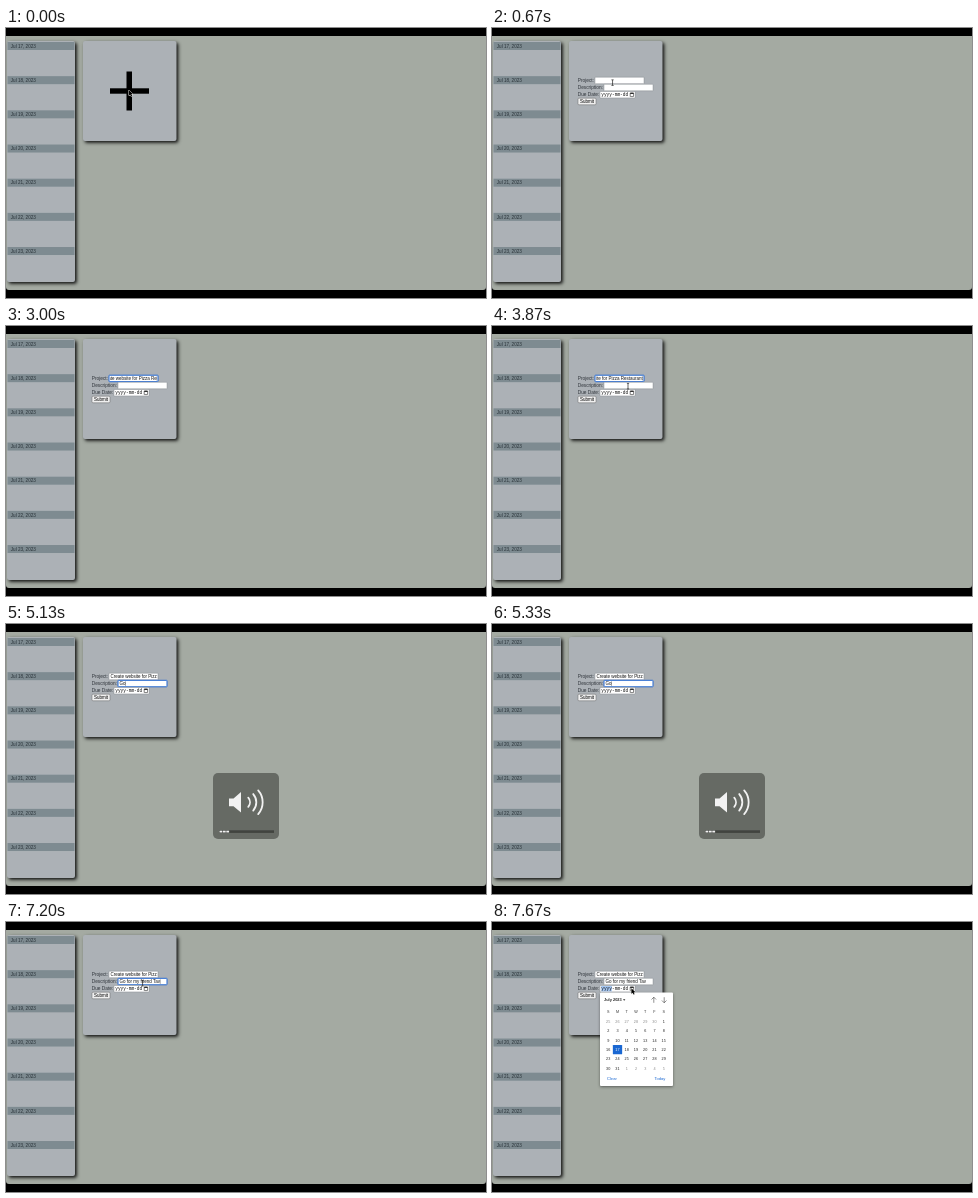
An HTML page with a canvas that plays this animation: 480x270 px, repeating every 8000 ms.

```html
<!DOCTYPE html>
<html lang="en">
<head>
<meta charset="utf-8">
<title>Project planner</title>
<style>
html, body { margin: 0; width: 100%; height: 100%; overflow: hidden; background: #000; }
canvas { display: block; width: 480px; height: 270px; }
</style>
</head>
<body>
<canvas id="stage"></canvas>
<script>
const LOOP = 8000;
const SANS = '"Liberation Sans", Arial, sans-serif';
const MONO = '"Liberation Mono", monospace';
const INK = '#30353b', BLUE = '#1967d2';
const canvas = document.getElementById('stage');
const c = canvas.getContext('2d');
const dpr = window.devicePixelRatio || 1;
canvas.width = 480 * dpr;
canvas.height = 270 * dpr;

const PROJECT = {
  x: 103, y: 49.2, w: 49, text: 'Create website for Pizza Restaurant',
  keys: [[929, 0], [930, 1], [1330, 6], [1530, 6], [1730, 11], [1870, 11], [1900, 12],
         [2040, 12], [2870, 27], [3010, 27], [3560, 35]]
};
const DESCRIPTION = {
  x: 112, y: 56.3, w: 49, text: 'Go for my friend Tav',
  keys: [[4540, 0], [4560, 1], [4720, 1], [4730, 2], [5300, 2], [5850, 4], [5980, 4],
         [6070, 6], [6260, 6], [7070, 20]]
};
const FORM_AT = 400, FOCUS_AT = 820, NEXT_AT = 4060, LEAVE_AT = 7400;
const PICKER_AT = 7460, SELECT_AT = 7660;

// linear value between [time, value] points
function along(keys, t) {
  if (t <= keys[0][0]) return keys[0][1];
  for (let i = 1; i < keys.length; i++) {
    const [t0, a] = keys[i - 1], [t1, b] = keys[i];
    if (t <= t1) return a + (b - a) * (t - t0) / (t1 - t0);
  }
  return keys[keys.length - 1][1];
}

function ease(t, from, to) {
  const p = Math.min(1, Math.max(0, (t - from) / (to - from)));
  return p * p * (3 - 2 * p);
}

function rect(x, y, w, h, color) {
  c.fillStyle = color;
  c.fillRect(x, y, w, h);
}

function round(x, y, w, h, r, fill, stroke, line = 0.5) {
  c.beginPath();
  c.roundRect(x, y, w, h, r);
  if (fill) { c.fillStyle = fill; c.fill(); }
  if (stroke) { c.strokeStyle = stroke; c.lineWidth = line; c.stroke(); }
}

function text(s, x, y, size, color = '#000', align = 'left', font = SANS, weight = '') {
  c.font = `${weight} ${size}px ${font}`;
  c.textAlign = align;
  c.fillStyle = color;
  c.fillText(s, x, y);
}

function shadowed(dx, dy, blur, color, draw) {
  c.save();
  c.shadowColor = color;
  c.shadowOffsetX = dx * dpr;
  c.shadowOffsetY = dy * dpr;
  c.shadowBlur = blur * dpr;
  draw();
  c.restore();
}

function panel(x, y, w, h) {
  shadowed(1.8, 1.8, 3.5, 'rgba(0,0,0,.9)', () => round(x, y, w, h, 2, '#acb1b6'));
}

function page() {
  rect(0, 0, 480, 270, '#000');
  round(0, 8, 480, 254, [0, 0, 3, 3], '#a4aaa2');
  panel(1, 13, 68, 241);
  for (let i = 0; i < 7; i++) {
    const y = 14 + i * 34.17;
    rect(1.5, y, 67, 8, '#7e8b91');
    text(`Jul ${17 + i}, 2023`, 4.8, y + 5.8, 4.6, '#273036');
  }
  panel(77, 13, 93.5, 100);
}

function plus() {
  rect(104, 60.3, 39, 5.4, '#000');
  rect(120.5, 43.5, 5.5, 39, '#000');
}

function field(f, t, focused) {
  const count = Math.floor(along(f.keys, t) + 1e-6);
  const s = f.text.slice(0, count);
  const left = f.x + 1.4, room = f.w - 2.6;
  round(f.x, f.y, f.w, 6.5, 0.5, '#fff', focused ? '#2367d1' : '#777d82', focused ? 1 : 0.4);
  c.save();
  c.beginPath();
  c.rect(left - 0.3, f.y, room + 0.6, 6.5);
  c.clip();
  c.font = `4.5px ${SANS}`;
  const width = c.measureText(s).width;
  const shift = focused ? Math.max(0, width - room) : 0;
  text(s, left - shift, f.y + 4.8, 4.5, '#111');
  if (focused) rect(left - shift + width, f.y + 1, 0.4, 4.6, '#333');
  c.restore();
}

function form(t) {
  text('Project:', 85.8, 53.8, 4.75, INK);
  text('Description:', 85.8, 60.9, 4.75, INK);
  text('Due Date:', 85.8, 68.2, 4.75, INK);
  field(PROJECT, t, t >= FOCUS_AT && t < NEXT_AT);
  field(DESCRIPTION, t, t >= NEXT_AT && t < LEAVE_AT);
  round(108, 63.5, 35, 6.4, 0.4, '#fff', '#777d82', 0.4);
  if (t >= SELECT_AT) rect(109.2, 64, 10.6, 5.4, '#a5c8f5');
  text('yyyy-mm-dd', 109.2, 68.1, 4.5, '#111', 'left', MONO);
  rect(137.7, 64.2, 4.8, 5, '#fff');
  round(138.2, 65, 3.4, 3.6, 0.3, null, '#222', 0.6);
  rect(138.2, 64.8, 3.4, 1.1, '#222');
  round(86, 70.2, 18, 6.6, 1, '#f0f0f0', '#666', 0.5);
  text('Submit', 95, 75.1, 4.5, '#000', 'center');
}

function volume(t) {
  if (t < 4730 || t > 5930) return;
  c.save();
  c.globalAlpha = 1 - ease(t, 5400, 5930);
  round(207, 149, 66, 66, 5, 'rgba(98,102,97,.94)');
  c.fillStyle = c.strokeStyle = '#f2f2f2';
  c.beginPath();
  c.moveTo(223, 174.5);
  c.lineTo(227.5, 174.5);
  c.lineTo(235, 168);
  c.lineTo(235, 188.5);
  c.lineTo(227.5, 182.3);
  c.lineTo(223, 182.3);
  c.fill();
  c.lineWidth = 1.8;
  c.lineCap = 'round';
  for (const r of [7, 12.5, 18]) {
    c.beginPath();
    c.arc(237 + (r - 7) * 0.15, 178.3, r, -0.72, 0.72);
    c.stroke();
  }
  rect(213, 206.3, 55, 2.6, '#41443f');
  for (let i = 0; i < 3; i++) rect(213.5 + i * 3.4, 206.7, 2.8, 1.8, '#f2f2f2');
  c.restore();
}

function arrowIcon(x, y, dir) {
  c.beginPath();
  c.moveTo(x, y - 2.8 * dir);
  c.lineTo(x, y + 2.8 * dir);
  c.moveTo(x - 2.3, y - 0.5 * dir);
  c.lineTo(x, y - 2.8 * dir);
  c.lineTo(x + 2.3, y - 0.5 * dir);
  c.strokeStyle = '#444';
  c.lineWidth = 0.6;
  c.stroke();
}

function picker() {
  shadowed(0, 1, 3, 'rgba(0,0,0,.45)', () => round(108, 70.5, 73, 93.5, 1, '#fff'));
  text('July 2023', 112, 79.4, 3.95, '#222', 'left', SANS, 'bold');
  c.beginPath();
  c.moveTo(131, 77.3);
  c.lineTo(133.4, 77.3);
  c.lineTo(132.2, 78.8);
  c.fill();
  arrowIcon(161.8, 78, 1);
  arrowIcon(172.2, 78, -1);
  const col = i => 116.2 + i * 9.25;
  [...'SMTWTFS'].forEach((d, i) => text(d, col(i), 91.3, 3.7, '#333', 'center'));
  for (let i = 0; i < 42; i++) {
    const date = new Date(2023, 5, 25 + i), day = date.getDate();
    const inside = date.getMonth() === 6, today = inside && day === 17;
    const x = col(i % 7), y = 99.7 + Math.floor(i / 7) * 9.33;
    if (today) round(x - 4.6, y - 4.7, 9.3, 9.3, 0.6, BLUE);
    text(day, x, y + 1.3, 3.8, today ? '#fff' : inside ? '#222' : '#8b8b8b', 'center');
  }
  text('Clear', 115, 157.9, 4.1, BLUE);
  text('Today', 173.3, 157.9, 4.1, BLUE, 'right');
}

function pointer(x, y) {
  const pts = [[0, 0], [0, 5.6], [1.3, 4.5], [2.2, 6.4], [3.1, 6], [2.3, 4.1], [4, 4]];
  c.beginPath();
  pts.forEach(([a, b]) => c.lineTo(x + a, y + b));
  c.closePath();
  c.lineJoin = 'round';
  c.strokeStyle = '#e8e8e4';
  c.lineWidth = 1;
  c.stroke();
  c.fillStyle = '#000';
  c.fill();
}

function beam(x, y) {
  c.beginPath();
  c.moveTo(x, y - 2.6);
  c.lineTo(x, y + 2.6);
  for (const end of [-2.8, 2.8]) {
    c.moveTo(x - 1.1, y + end);
    c.lineTo(x + 1.1, y + end);
  }
  c.strokeStyle = '#222';
  c.lineWidth = 0.7;
  c.stroke();
}

function mouse(t) {
  if (t < 930) {
    const p = ease(t, 430, 760);
    if (p < 0.8) pointer(123 - 3 * p, 62 - 9 * p);
    else beam(123 - 3 * p, 62 - 9 * p);
  } else if (t > 3580 && t < 4540) {
    const p = ease(t, 3580, 3800);
    beam(120 + 16 * p, 53 + 7.2 * p);
  } else if (t > 7130) {
    const p = ease(t, 7130, 7400);
    if (p < 0.5) beam(136 + 3.4 * p, 60.2 + 6 * p);
    else pointer(136 + 3.4 * p, 60.2 + 6 * p);
  }
}

function draw(now) {
  const t = now % LOOP;
  c.setTransform(dpr, 0, 0, dpr, 0, 0);
  page();
  if (t < FORM_AT) plus();
  else form(t);
  volume(t);
  if (t >= PICKER_AT) picker();
  mouse(t);
}

let start;
function tick(now) {
  start ??= now;
  draw(now - start);
  requestAnimationFrame(tick);
}
draw(0);
requestAnimationFrame(tick);
</script>
</body>
</html>
```
